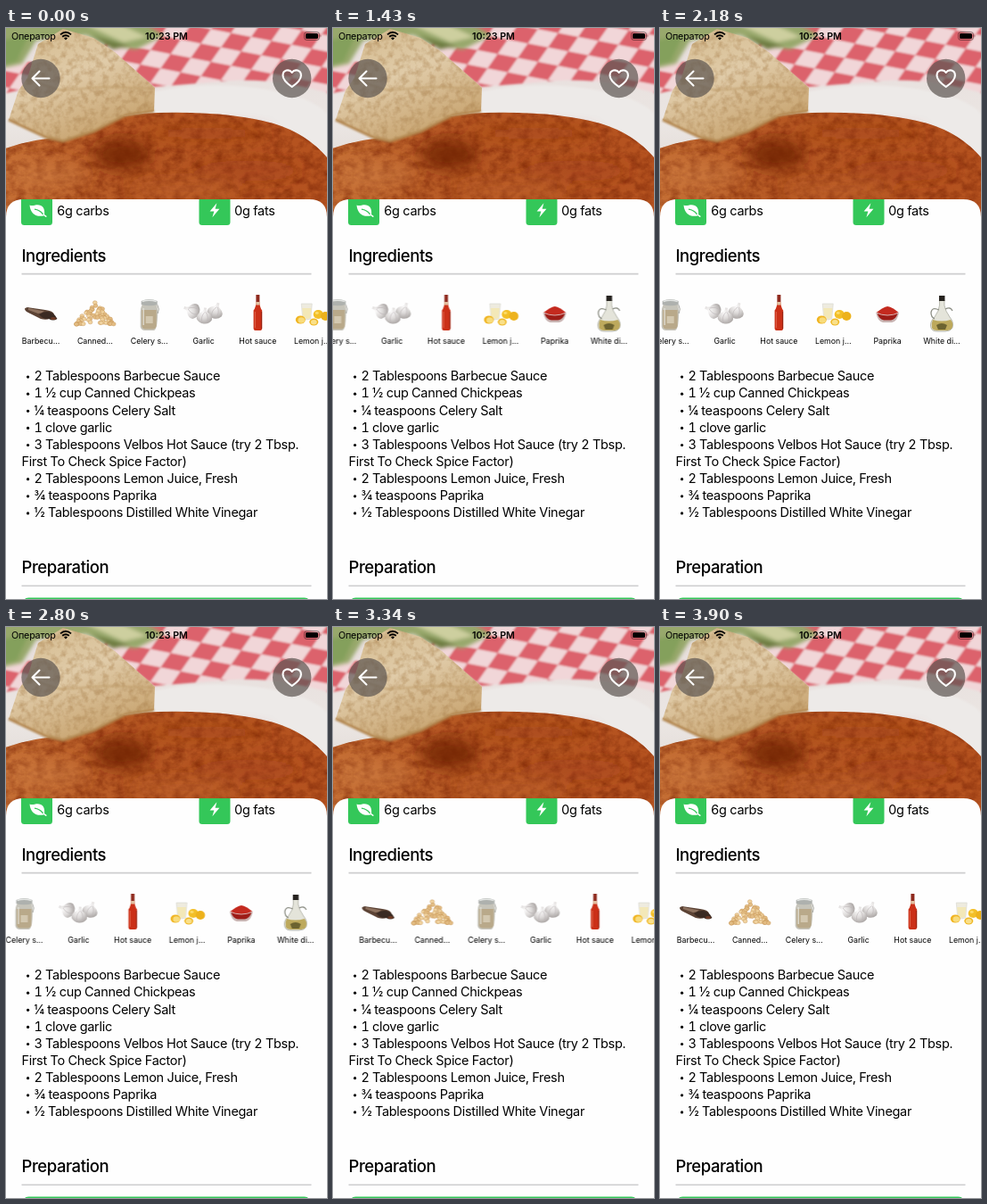
Recreate the animation shown at these times as an HTML page. Size 360 by 640 pixels, loop 4000 ms.

```html
<!DOCTYPE html>
<html lang="en">
<head>
<meta charset="utf-8">
<title>Recipe</title>
<style>
  html, body { margin: 0; width: 100%; height: 100%; overflow: hidden; background: #fefefe; }
  svg { display: block; width: 360px; height: 640px; }
  text { font-family: Inter, sans-serif; fill: #000; }
  .body text { font-size: 14.5px; letter-spacing: -.021em; font-variant-numeric: tabular-nums; }
  .head { font-size: 18.5px; font-weight: 500; letter-spacing: -.024em; }
  .label { font-size: 8.8px; text-anchor: middle; }
  .line { stroke: #cdcdcf; stroke-width: 1.6; }
  .icon { fill: none; stroke: #fff; stroke-width: 2.1; stroke-linecap: round; stroke-linejoin: round; }
</style>
</head>
<body>
<svg viewBox="0 0 360 640">
  <defs>
    <pattern id="check" width="46" height="36" patternUnits="userSpaceOnUse" patternTransform="translate(4 -6) rotate(11) skewX(-24)">
      <rect width="46" height="36" fill="#f1d6d8"/>
      <path d="M0 0h23v18H0zM23 18h23v18H23z" fill="#dc626c"/>
    </pattern>
    <linearGradient id="soupFill">
      <stop offset="0" stop-color="#c56f35"/><stop offset=".4" stop-color="#b55722"/><stop offset="1" stop-color="#b5521f"/>
    </linearGradient>
    <linearGradient id="crumb" x2=".5" y2="1">
      <stop offset="0" stop-color="#d3b98c"/><stop offset=".5" stop-color="#e0cba8"/><stop offset="1" stop-color="#c8a470"/>
    </linearGradient>
    <linearGradient id="rim" x2="0" y2="1">
      <stop offset="0" stop-color="#e6dcda"/><stop offset=".5" stop-color="#ebe6e3"/><stop offset="1" stop-color="#d9cfc9"/>
    </linearGradient>
    <radialGradient id="clove" cx=".4" cy=".3" r=".75">
      <stop offset="0" stop-color="#fbfafa"/><stop offset=".5" stop-color="#dddad9"/><stop offset="1" stop-color="#a8a3a1"/>
    </radialGradient>
    <filter id="soft"><feGaussianBlur stdDeviation="2"/></filter>
    <filter id="faint"><feGaussianBlur stdDeviation=".8"/></filter>
    <filter id="wide" x="-50%" y="-50%" width="200%" height="200%"><feGaussianBlur stdDeviation="8"/></filter>
    <filter id="grain" x="0" y="0" width="100%" height="100%" color-interpolation-filters="sRGB">
      <feTurbulence type="fractalNoise" baseFrequency=".09 .12" numOctaves="4" seed="4"/>
      <feColorMatrix values="0 0 0 0 .5  0 0 0 0 .16  0 0 0 0 .03  1.4 0 0 0 -.5"/>
      <feComposite in2="SourceAlpha" operator="in" result="n"/>
      <feMerge><feMergeNode in="SourceGraphic"/><feMergeNode in="n"/></feMerge>
    </filter>
    <filter id="crust" x="0" y="0" width="100%" height="100%" color-interpolation-filters="sRGB">
      <feTurbulence type="fractalNoise" baseFrequency=".13" numOctaves="3" seed="9"/>
      <feColorMatrix values="0 0 0 0 .66  0 0 0 0 .5  0 0 0 0 .3  1.2 0 0 0 -.5"/>
      <feComposite in2="SourceAlpha" operator="in" result="n"/>
      <feMerge><feMergeNode in="SourceGraphic"/><feMergeNode in="n"/></feMerge>
    </filter>
    <clipPath id="hero"><rect width="360" height="215"/></clipPath>
    <clipPath id="below"><rect y="192" width="360" height="448"/></clipPath>
  </defs>

  <g clip-path="url(#hero)">
    <rect width="360" height="215" fill="url(#rim)"/>
    <g filter="url(#faint)">
      <path d="M120-4H364V74Q300 54 240 60L166 66 110 20Z" fill="url(#check)"/>
      <path d="M-4 38H30V66L-4 74Z" fill="url(#check)"/>
    </g>
    <g filter="url(#soft)">
      <path d="M-8-8H150L178 8 146 24 112 20 90 8 34 14 18 40-8 46Z" fill="#98a86c"/>
      <path d="M84-6 128-4 158 10 132 16Z" fill="#cdcf9f"/>
      <path d="M96 8 138 20 120 24Z" fill="#6d7c41"/>
      <path d="M-6 14 26 8 12 38-6 42Z" fill="#84a05b"/>
    </g>
    <path d="M164 72Q250 54 330 78 352 86 362 98V150L160 110Z" fill="#edeae8" filter="url(#faint)"/>
    <path d="M-4 136Q30 124 66 122 110 97 170 95 250 93 300 107 340 119 364 150V216H-4Z" fill="url(#soupFill)" filter="url(#grain)"/>
    <g filter="url(#wide)">
      <ellipse cx="130" cy="142" rx="32" ry="17" fill="#6f1f08" opacity=".8"/>
      <ellipse cx="225" cy="118" rx="70" ry="7" fill="#a2441b" opacity=".5"/>
      <ellipse cx="270" cy="160" rx="60" ry="12" fill="#a23c13" opacity=".35"/>
      <ellipse cx="45" cy="165" rx="45" ry="16" fill="#d28345" opacity=".45"/>
      <ellipse cx="200" cy="180" rx="60" ry="8" fill="#cc7438" opacity=".4"/>
    </g>
    <path d="M3 103 14 70 24 56 36 18 64 1 98 11 122 27 167 67 166 93 134 98 98 116 64 127 46 123Z" fill="url(#crumb)" filter="url(#crust)"/>
    <path d="M3 103 46 123 64 127 98 116 134 98 166 93" fill="none" stroke="#b28650" stroke-width="3" filter="url(#faint)"/>
    <path d="M24 58 62 70 112 66 166 68" fill="none" stroke="#b99662" stroke-width="2" opacity=".6" filter="url(#faint)"/>
  </g>

  <path d="M0 640V212Q0 192 20 192H340Q360 192 360 212V640Z" fill="#fefefe"/>

  <text x="6" y="13" font-size="10.8" letter-spacing="-.25">Оператор</text>
  <g fill="none" stroke="#000" stroke-width="1.9">
    <path d="M61 7.4Q67 2.2 73 7.4M63.2 9.8Q67 6.6 70.8 9.8"/>
    <path d="M65 11.4Q67 9.8 69 11.4L67 13.4Z" fill="#000" stroke="none"/>
  </g>
  <text x="180" y="13" font-size="10.7" font-weight="600" text-anchor="middle">10:23 PM</text>
  <rect x="334.5" y="4.5" width="17" height="9" rx="2.8" fill="none" stroke="#000" stroke-opacity=".4"/>
  <rect x="336" y="6" width="14" height="6" rx="1.5"/>
  <path d="M352.7 7.4q1.5 1.6 0 3.2z" opacity=".45"/>

  <g fill="#5d5652" fill-opacity=".7">
    <circle cx="39" cy="56.5" r="21.7"/><circle cx="320.7" cy="56.5" r="21.7"/>
  </g>
  <path class="icon" d="M48.5 56.5H29.8M37.5 48.5 29.5 56.5 37.5 64.5"/>
  <path class="icon" d="M320.7 66C313.8 61.2 310.5 57.400 310.500 53.200 310.500 47.200 317.500 45.400 320.700 49.900 323.900 45.400 330.900 47.200 330.900 53.200 330.900 57.400 327.600 61.200 320.700 66Z"/>

  <g clip-path="url(#below)">
    <rect x="17" y="186" width="35" height="35" rx="3.5" fill="#34c759"/>
    <rect x="216.500" y="186" width="35" height="35" rx="3.5" fill="#34c759"/>
    <path d="M26.500 198.500C30 200.400 34 197 39 199 43 200.600 43.600 205.600 43 210 36 212.600 27.400 209.500 26.500 198.500Z" fill="#fff"/>
    <path d="M32 203.200Q38 204 41.500 208.800" fill="none" stroke="#34c759" stroke-width="1.300"/>
    <path d="M42.500 209.500 44.800 211.200" class="icon" style="stroke-width:1.5"/>
    <path d="M236.4 196.2 228.6 205.6H233.4L231.4 212.2 239.4 202.7H234.6Z" fill="#fff"/>
  </g>

  <g class="body" id="body">
    <text x="57" y="209.6">6g carbs</text>
    <text x="256" y="209.6">0g fats</text>
  </g>
  <text class="head" x="17.5" y="262">Ingredients</text>
  <path class="line" d="M17.5 275.6H342.5"/>
  <g id="rail"></g>
  <text class="head" x="17.5" y="611">Preparation</text>
  <path class="line" d="M17.5 625.2H342.5"/>
  <rect x="17.5" y="638.6" width="325" height="40" rx="8" fill="#34c759"/>
</svg>

<script>
const $ = id => document.getElementById(id);
const add = (id, markup) => $(id).insertAdjacentHTML('beforeend', markup);

const lines = [
  '• 2 Tablespoons Barbecue Sauce',
  '• 1 ½ cup Canned Chickpeas',
  '• ¼ teaspoons Celery Salt',
  '• 1 clove garlic',
  '• 3 Tablespoons Velbos Hot Sauce (try 2 Tbsp.',
  'First To Check Spice Factor)',
  '• 2 Tablespoons Lemon Juice, Fresh',
  '• ¾ teaspoons Paprika',
  '• ½ Tablespoons Distilled White Vinegar'
];
lines.forEach((line, i) => {
  const y = 395.3 + i * 19.1;
  const item = line.startsWith('• ');
  if (item) add('body', `<circle cx="24.6" cy="${y - 4.2}" r="1.6"/>`);
  add('body', `<text x="${item ? 31.4 : 17.5}" y="${y}">${item ? line.slice(2) : line}</text>`);
});

let seed = 7;
const rand = () => (seed = seed * 16807 % 2147483647) / 2147483647;
const shape = (d, fill, extra = '') => `<path d="${d}" fill="${fill}" ${extra}/>`;
const stroke = (d, color, width) => shape(d, 'none', `stroke="${color}" stroke-width="${width}"`);
const oval = (x, y, rx, ry, fill, extra = '') =>
  `<ellipse cx="${x}" cy="${y}" rx="${rx}" ry="${ry}" fill="${fill}" ${extra}/>`;

// Icons are drawn around (0, 0), the middle of the picture
const scoop = () =>
  shape('M-18-5.5Q-16-8-12-6.500L5-4Q14-3 15 1 10 9 0 6L-14-1Q-18-3-18-5.500Z', '#5b4234') +
  shape('M-14-6 4-2.500Q0 0-3 0L-14-4Z', '#8f7360') +
  shape('M-2 1Q6-4 13-.5 17 2 18.500 6 14 9 9 6 2 6.500-2 1Z', '#3a2a22') +
  oval(14, 5.5, 3, 1.6, '#6d3a25');

// A mound of peas, painted from back to front
const chickpeas = () => {
  const peas = Array.from({ length: 70 }, () => {
    const x = rand() * 42 - 21;
    const top = 25 * Math.pow(Math.abs(x) / 21, 1.4) - 13;
    return { x, y: top + rand() * (12 - top) };
  });
  peas.sort((a, b) => a.y - b.y);
  return peas.map(p => oval(p.x, p.y, 2.4, 2.1, rand() < .55 ? '#f0d3a0' : '#e3bd84',
    'stroke="#c9985a" stroke-width=".5"')).join('');
};

const jar = () =>
  shape('M-8-10Q-10-6-10-2V15Q-9 19-5 19H5Q9 19 9.500 0 9.500-7 8-10Z', '#c6c4ba') +
  shape('M-8.500-4H8V14Q7 17.500 4 17.500H-4Q-8 17.500-8.500 14Z', '#b9a98a') +
  shape('M-4 3H4V11H-4Z', '#d3c8b0') +
  shape('M-9-14Q0-18 9-14V-10Q0-7.500-9-10Z', '#aeb1ae') +
  stroke('M-8-13.500Q0-16 8-13.500', '#e4e6e4', 1.5) +
  stroke('M9-10Q12-5 9.500 0', '#a3a39c', 1) +
  stroke('M-6.500-6V13', '#e4e2da', 1.2);

const bulb = (x, y, size, tilt) =>
  `<g transform="translate(${x} ${y}) rotate(${tilt}) scale(${size})">` +
  shape('M-1.500-11Q-1-6.500-5-5-10-2-9 3-6 8 0 8 6 8 9 3 10-2 5-5 1-6.500 1.500-11Z', 'url(#clove)') +
  stroke('M0-6Q-5 0-2 7M1-6Q6 0 3 7', '#bcb5b6', .6) + '</g>';
const garlic = () => bulb(-12, -3, .95, -70) + bulb(13, -2, .95, 20) + bulb(1, 4, .95, 5);

const sauce = () =>
  shape('M-2-21H2V-13H-2Z', '#8f2a1e') +
  shape('M-2-13H2Q2-7 4.800-3.500V17Q4.500 19 3 19H-3Q-4.500 19-4.800 17V-3.500Q-2-7-2-13Z', '#cb3018') +
  shape('M-2.200-13H2.200V-9.500H-2.200Z', '#e2bfa0') +
  stroke('M-3-2V16', '#df6249', 1) +
  stroke('M4.200-2V17', '#94200f', 1);

const lemon = () =>
  shape('M-12-11H0L-1.500 6Q-6 8-10.500 6Z', '#eeebdf', 'stroke="#d5d6ce" stroke-width=".6"') +
  shape('M-11-6H-1L-2 5Q-6 6.500-10 5Z', '#f3e8b8') +
  oval(7, 1, 5.6, 5, '#f3bf27') + oval(15, 3, 5.2, 5, '#edb21c') +
  oval(5.5, -.5, 2, 1.4, '#fbdc6c') +
  oval(-13, 7, 5.5, 4.6, '#f0b523') + oval(-12, 7.5, 3.7, 3.2, '#f8dc7c') +
  oval(2, 9.5, 5, 4, '#efb827') + oval(2, 9.8, 3.4, 2.7, '#f9e08a');

const paprika = () =>
  shape('M-13-1Q-11 9-5 10H5Q11 9 13-1Z', '#c9b5b3') +
  shape('M-11.500 0Q-9 7-4 7.500H4Q9 7 11.500 0Z', '#9d1c17') +
  shape('M-12.500-1Q-5-7 0-8 6-7 12.500-1 0 5-12.500-1Z', '#c42a1f') +
  stroke('M-13-1Q0 5 13-1', '#e6dada', .8);

const vinegar = () =>
  shape('M-2.500-15H3V-9Q4-3 9 4 14 10 12 16 10 20 4 20H-5Q-11 20-12 16-14 10-8 4-3-3-2.500-9Z', '#e4e4da', 'stroke="#a9aa9f" stroke-width=".8"') +
  shape('M-10 7Q0 10 10 7 14 12 11 17 9 19 4 19H-5Q-10 19-11 16-12 11-10 7Z', '#bda95c') +
  shape('M-6 13Q0 9 6 13L4 18H-4Z', '#6c6330') +
  stroke('M-3-4Q-11-8-12-1-12 4-8 6M4-5Q10-8 12-3', '#8c8e84', 1.3) +
  shape('M-3-20H3.500V-14H-3Z', '#26231f');

const items = [
  ['Barbecu…', scoop], ['Canned…', chickpeas], ['Celery s…', jar], ['Garlic', garlic],
  ['Hot sauce', sauce], ['Lemon j…', lemon], ['Paprika', paprika], ['White di…', vinegar]
];
items.forEach(([name, draw], i) => add('rail',
  `<g transform="translate(${39 + i * 60.85} 320)">${draw()}<text class="label" y="34.4">${name}</text></g>`));

// Scroll position: [ms, px], each held until the next
const LOOP = 4000;
const steps = [
  [0, 0], [970, -.4], [1090, -18], [1200, -65], [1310, -118], [1430, -155.5],
  [1530, -174], [1640, -185], [1740, -190], [1840, -192.3], [1960, -182],
  [2060, -160], [2160, -149], [2290, -144],
  [2690, -143], [2800, -140.3], [2900, -114], [3010, -68], [3120, -22],
  [3230, 10], [3340, 11.5], [3450, 8], [3560, 5], [3670, 3], [3780, 1.8], [3900, 1], [LOOP, 0]
];
$('rail').animate(
  steps.map(([ms, x]) => ({ offset: ms / LOOP, transform: `translateX(${x}px)`, easing: 'step-end' })),
  { duration: LOOP, iterations: Infinity }
);
</script>
</body>
</html>
```
